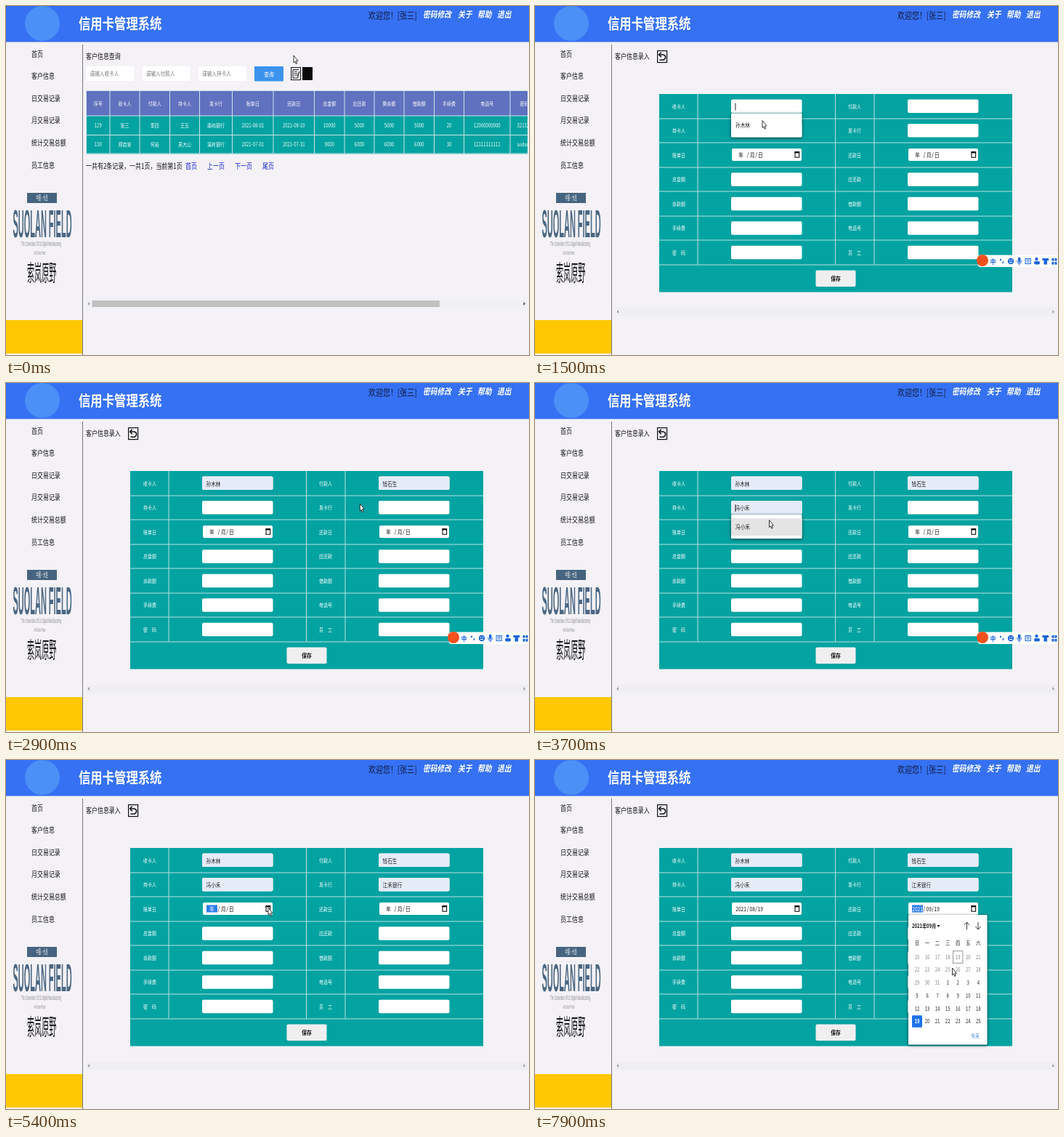
An HTML page with a canvas for the animation above (8000 ms loop, 720 by 480 pixels).

```html
<!DOCTYPE html>
<html lang="zh-CN">
<head>
<meta charset="utf-8">
<title>信用卡管理系统</title>
<style>
  html, body { margin: 0; width: 720px; height: 480px; overflow: hidden; background: #f4f2f7; }
  canvas { display: block; }
</style>
</head>
<body>
<canvas id="stage" width="720" height="480"></canvas>
<script>
const ctx = document.getElementById('stage').getContext('2d');
const LOOP = 8000, STEP = 100;
const SQUEEZE = 0.81; // the screen is shown narrower than it is tall
const SANS = '"Noto Sans CJK SC", "Noto Sans CJK", sans-serif';
const TEAL = '#02a3a1', AUTOFILL = '#e5ecf8', PICK = '#1f72ea';
const LEFT = 270, RIGHT = 513;

// Cursor path: time, x, y
const path = [
  [0, 396, 68], [100, 397, 79], [200, 399, 92], [400, 399, 93], [600, 349, 94],
  [900, 318, 130], [1200, 316, 138], [1600, 312, 164], [1900, 312, 164],
  [2200, 555, 138], [2300, 553, 139], [2400, 547, 149], [2600, 541, 163], [2800, 541, 164],
  [3200, 326, 172], [3300, 325, 173], [3600, 323, 187], [3800, 322, 190], [3900, 322, 192],
  [4200, 556, 171], [4300, 555, 173], [4600, 546, 196], [4800, 545, 198],
  [5200, 365, 205], [5400, 361, 203], [5600, 359, 212], [6000, 339, 305], [6300, 339, 306],
  [6700, 613.5, 206], [6900, 604, 204], [7100, 603, 205], [7400, 610, 227], [7600, 610, 228],
  [7900, 574.5, 286]
];

const picks = [
  { x: LEFT, row: 0, name: '孙木林', open: 1200, hover: 1600, done: 1900 },
  { x: RIGHT, row: 0, name: '钱石生', open: 2300, hover: 2600, done: 2800 },
  { x: LEFT, row: 1, name: '冯小禾', open: 3300, hover: 3600, done: 3900 },
  { x: RIGHT, row: 1, name: '江禾银行', open: 4300, hover: 4600, done: 4800 }
];

function rect(x, y, w, h, color) {
  ctx.fillStyle = color;
  ctx.fillRect(x, y, w, h);
}

function box(x, y, w, h, color, r = 2) {
  ctx.fillStyle = color;
  ctx.beginPath();
  ctx.roundRect(x, y, w, h, r);
  ctx.fill();
}

function disc(x, y, r, color) {
  ctx.fillStyle = color;
  ctx.beginPath();
  ctx.arc(x, y, r, 0, 7);
  ctx.fill();
}

function stroke(points, color = '#111', width = 1) {
  ctx.strokeStyle = color;
  ctx.lineWidth = width;
  ctx.beginPath();
  points.forEach(([x, y], i) => i ? ctx.lineTo(x, y) : ctx.moveTo(x, y));
  ctx.stroke();
}

function frame(x, y, w, h, color, width = 1) {
  ctx.strokeStyle = color;
  ctx.lineWidth = width;
  ctx.strokeRect(x, y, w, h);
}

function shadowBox(x, y, w, h) {
  ctx.save();
  ctx.shadowColor = 'rgba(0,0,0,.6)';
  ctx.shadowBlur = 4;
  ctx.shadowOffsetY = 1;
  box(x, y, w, h, '#fff', 1);
  ctx.restore();
}

// Text with y as the middle of the glyphs
function text(s, x, y, size, color = '#111', o = {}) {
  ctx.save();
  ctx.translate(x, y + size * 0.37);
  ctx.scale(o.squeeze || SQUEEZE, 1);
  ctx.font = `${o.style || 'normal'} ${o.weight || 400} ${size}px ${o.font || SANS}`;
  ctx.textAlign = o.align || 'left';
  ctx.fillStyle = color;
  ctx.fillText(s, 0, 0);
  ctx.restore();
}

const center = (s, x, y, size, color, o = {}) => text(s, x, y, size, color, { ...o, align: 'center' });

function header() {
  rect(0, 0, 720, 49.5, '#3671f4');
  disc(50, 24, 24, '#4a90f6');
  text('信用卡管理系统', 100, 24.5, 20.2, '#fff', { weight: 900 });
  text('欢迎您！[张三]', 499, 13, 12.3, '#101a38');
  [['密码修改', 574], ['关于', 622], ['帮助', 649], ['退出', 676]].forEach(([s, x]) =>
    text(s, x, 11.5, 12, '#fff', { weight: 700, style: 'italic' }));
}

function sidebar() {
  rect(105, 53, 1, 427, '#77767a');
  ['首页', '客户信息', '日交易记录', '月交易记录', '统计交易总额', '员工信息'].forEach((s, i) =>
    text(s, 35, 66 + i * 30.6, 9.84));
  rect(29, 257, 41, 14, '#46647f');
  center('中国·大连', 49.5, 264, 9, '#fff', { squeeze: 0.36 });
  const ink = '#4b6782', latin = '"Liberation Sans", sans-serif';
  text('SUOLAN FIELD', 9.5, 298, 53, ink, { weight: 700, font: latin, squeeze: 0.207 });
  center('The Consortium Of Co Digital Manufacturing', 48.5, 326.5, 9, '#8a8a90', { font: latin, squeeze: 0.31 });
  center('Art Data Place', 46.5, 339, 8, '#8a8a90', { font: latin, squeeze: 0.31 });
  text('索岚原野', 29, 367, 31, '#1c1c1e', { squeeze: 0.325 });
  rect(0, 432, 105, 46, '#ffc803');
}

function scrollbar(y, thumb) {
  rect(110, y - 5, 608, 10, thumb ? '#f1f0f3' : '#efeef1');
  if (thumb) rect(118.5, y - 4.5, 478.5, 9, '#c1c1c1');
  [[114, -1], [713.5, 1]].forEach(([x, d]) => {
    ctx.fillStyle = thumb && d > 0 ? '#444' : '#999';
    ctx.beginPath();
    ctx.moveTo(x - d, y - 2.5);
    ctx.lineTo(x + d * 1.5, y);
    ctx.lineTo(x - d, y + 2.5);
    ctx.fill();
  });
}

function listPage() {
  text('客户信息查询', 110, 69.5, 9.84, '#111', { weight: 500 });
  ['请输入收卡人', '请输入付款人', '请输入持卡人'].forEach((s, i) => {
    const x = 110.5 + i * 77.3;
    box(x, 83, 66, 20, '#fff', 1);
    text(s, x + 5, 93, 8.2, '#777');
  });
  box(342, 83, 40, 20.5, '#3c93ef', 1);
  center('查询', 362, 93.5, 8.4, '#fff');

  frame(392.6, 84.6, 13, 17, '#222', 1.1);
  stroke([[402, 95], [402, 99], [395, 99], [395, 87.5], [403, 87.5]], '#222');
  [90, 92.5, 95].forEach(y => stroke([[396.5, y], [401, y]], '#222', 0.9));
  stroke([[401.5, 96], [404, 90]], '#222', 1.3);
  rect(408, 84, 14, 18, '#0a0a0a');

  ctx.save();
  ctx.beginPath();
  ctx.rect(110, 116, 608, 88);
  ctx.clip();
  rect(110.5, 116.5, 610, 35, '#6071bf');
  rect(110.5, 151, 610, 52.5, TEAL);
  const edges = [110.5, 143, 184, 225.5, 266.5, 311.5, 368, 424.5, 466, 507, 548, 589.5, 630.5, 694, 733];
  const rows = [
    ['序号', '收卡人', '付款人', '持卡人', '发卡行', '账单日', '还款日', '总金额', '应还款', '剩余额', '借款额', '手续费', '电话号', '密码'],
    ['129', '张三', '李四', '王五', '南屿银行', '2021-08-01', '2021-08-10', '10000', '5000', '5000', '5000', '20', '12000000000', '321321'],
    ['130', '郑启安', '何岩', '吴大山', '溪岭银行', '2021-07-01', '2021-07-31', '9000', '6000', '6000', '6000', '30', '12111111111', 'asdasd']
  ];
  const line = '#c9e4ea';
  edges.forEach(x => rect(x - 0.5, 116.5, 1, 87, line));
  [116.5, 151, 177.5, 203].forEach(y => rect(110, y - 0.5, 610, 1, line));
  rows.forEach((cells, r) => cells.forEach((s, c) =>
    center(s, (edges[c] + edges[c + 1]) / 2, [134, 164.5, 190.5][r], 7.4, '#fff')));
  ctx.restore();

  text('一共有2条记录，一共1页，当前第1页', 110, 220.5, 9.84);
  [['首页', 247], ['上一页', 277], ['下一页', 315], ['尾页', 353]].forEach(([s, x]) =>
    text(s, x, 220.5, 9.84, '#1420d0'));
  scrollbar(409.5, true);
}

const rowTop = r => 121 + r * 33.55;

function dateField(x, value, focused) {
  box(x + 1, 196, 96, 17, '#fff');
  if (focused) rect(x + 6, 199.5, 15, 10, '#2b7de9');
  const [y, m, d] = value || ['年', '月', '日'];
  center(y, x + 13.6, 204.5, 8.2, focused ? '#fff' : '#111');
  center('/', x + 23, 204.5, 8.2);
  center(m, x + 29.3, 204.5, 8.2);
  center('/', x + 34.6, 204.5, 8.2);
  center(d, x + 40.2, 204.5, 8.2);
  frame(x + 88, 200.8, 5.6, 7.4, '#111', 1.1);
  rect(x + 87.5, 200, 6.6, 2.4, '#111');
}

function formPage(t) {
  text('客户信息录入', 110, 69.5, 9.84, '#111', { weight: 500 });
  frame(168.6, 61.6, 13, 16, '#111', 1.2);
  stroke([[171, 67], [177, 67], [179.5, 69], [179.5, 72], [177, 74.2], [171.5, 74.2]], '#111', 1.6);
  stroke([[173.8, 63.8], [170.6, 67], [173.8, 70.2]], '#111', 1.6);

  rect(171, 121, 486, 272.5, TEAL);
  const line = '#b9e2e1';
  for (let r = 1; r < 8; r++) rect(171, Math.round(rowTop(r)) - 0.5, 486, 1, line);
  [224, 413.5, 467].forEach(x => rect(x - 0.5, 121, 1, 234.5, line));

  const labels = [['收卡人', '付款人'], ['持卡人', '发卡行'], ['账单日', '还款日'], ['总金额', '应还款'],
    ['余款额', '借款额'], ['手续费', '电话号'], ['密　码', '员　工']];
  labels.forEach((pair, r) => {
    center(pair[0], 198, rowTop(r) + 17, 7.4, '#fff');
    center(pair[1], 440, rowTop(r) + 17, 7.4, '#fff');
    if (r !== 2) [LEFT, RIGHT].forEach(x => box(x, rowTop(r) + 7.5, 97.5, 18.5, '#fff'));
  });
  box(386.5, 363.5, 55, 22.5, '#efeff0');
  center('保存', 414, 375, 8.4, '#111', { weight: 700 });

  dateField(LEFT, t >= 6300 && ['2021', '08', '19'], t >= 5400 && t < 7000);
  dateField(RIGHT, t >= 7500 && ['2021', '09', '19'], t >= 7000);
  scrollbar(420.5, false);

  picks.forEach(p => pickField(p, t));
  if (t >= 5500 && t < 6300) calendar(271, 0, false);
  if (t >= 7100) calendar(514, t < 7500 ? 0 : Math.floor((t - 7500) / 200), t >= 7500);
  if (t >= 1200 && t < 5400) inputBar();
}

function pickField(p, t) {
  if (t < p.open) return;
  const y = rowTop(p.row) + 7.5, active = t < p.done, filled = t >= p.hover;
  if (filled) {
    box(p.x, y, 97.5, 18.5, AUTOFILL);
    text(p.name, p.x + 5.5, y + 10, 8.2, '#222');
  }
  if (!active) return;
  rect(p.x + 5.5, y + 5, 0.9, 10, '#111');
  shadowBox(p.x, y + 19, 97.5, 33);
  if (filled) rect(p.x, y + 24, 97.5, 24, '#e4e4e4');
  text(p.name, p.x + 6, y + 35.5, 8.2, '#222');
}

function arrow(x, y, d) {
  stroke([[x, y - 5 * d], [x, y + 5 * d]], '#222', 0.9);
  stroke([[x - 3.6, y + d], [x, y + 5 * d], [x + 3.6, y + d]], '#222', 0.9);
}

function calendar(x, scroll, september) {
  shadowBox(x, 213, 108.5, 178.5);
  text(september ? '2021年09月' : '2021年08月', x + 5, 228, 7.4, '#111', { weight: 700 });
  ctx.fillStyle = '#111';
  ctx.beginPath();
  ctx.moveTo(x + 39.5, 227);
  ctx.lineTo(x + 43.5, 227);
  ctx.lineTo(x + 41.5, 230);
  ctx.fill();
  arrow(x + 80.5, 228, -1);
  arrow(x + 96, 228, 1);
  const month = september ? 8 : 7;
  for (let i = 0; i < 42; i++) {
    const cx = x + 12 + (i % 7) * 14.05, cy = 271 + Math.floor(i / 7) * 17.75;
    if (i < 7) center('日一二三四五六'[i], cx, 251, 7.4);
    const day = new Date(2021, 7, 1 + i + scroll * 7), n = day.getDate(), m = day.getMonth();
    const chosen = september && m === 8 && n === 19;
    if (chosen) box(cx - 7, cy - 8.5, 14, 16.5, PICK, 1);
    if (m === 7 && n === 19) frame(cx - 6.7, cy - 8.3, 13.4, 16.6, '#8a8a8a', 0.9);
    center(n, cx, cy, 7.4, chosen ? '#fff' : m === month ? '#222' : '#808080', { weight: chosen ? 700 : 400 });
  }
  center('今天', x + 92, 379.5, 7.4, '#2574d8');
}

function inputBar() {
  const blue = '#1b66dc';
  box(610, 342.5, 114, 16.5, '#fff', 3);
  disc(616, 350, 8, '#f4511e');
  center('中', 630.5, 351, 9.5, blue, { weight: 700 });
  disc(641, 349, 1.2, blue);
  stroke([[645, 351], [643.8, 354]], blue, 1.4);
  disc(655, 351, 4.2, blue);
  rect(652.8, 349, 1.4, 1.4, '#fff');
  rect(655.8, 349, 1.4, 1.4, '#fff');
  rect(653, 352, 4, 1.2, '#fff');
  box(665, 345.5, 3.4, 7, blue);
  stroke([[663.5, 350], [664.5, 353.5], [668.8, 353.5], [669.8, 350]], blue, 0.9);
  rect(666.2, 353.5, 1, 3, blue);
  frame(675, 347.5, 7.4, 7, blue);
  [349.5, 352].forEach(y => stroke([[676.5, y], [681, y]], blue, 1.1));
  disc(690.5, 348, 2.2, blue);
  box(687, 351, 8, 4.6, blue);
  rect(700.5, 347, 4.6, 8.5, blue);
  rect(698.5, 347, 8.6, 3, blue);
  [711.5, 715.5].forEach(x => [347, 352].forEach(y => rect(x, y, 3, 3.6, blue)));
}

function statusBar() {
  box(-2, 468, 119, 14, '#c3c4c8', 2);
  box(-2, 469, 118, 14, '#dfe1e5', 2);
  text('user-20200618gm:3000/customer/add', 2.5, 475, 7.4, '#3a3c40');
}

function cursor(t) {
  const i = Math.max(1, path.findIndex(p => p[0] >= t));
  const [t0, x0, y0] = path[i - 1], [t1, x1, y1] = path[i];
  const k = (t - t0) / (t1 - t0);
  ctx.save();
  ctx.translate(x0 + (x1 - x0) * k, y0 + (y1 - y0) * k);
  ctx.beginPath();
  [[0, 0], [0, 10], [1.9, 8.2], [3.2, 11.6], [4.7, 10.9], [3.4, 7.6], [5.8, 7.3]].forEach(p => ctx.lineTo(...p));
  ctx.closePath();
  ctx.fillStyle = '#fff';
  ctx.fill();
  ctx.strokeStyle = '#222';
  ctx.lineWidth = 0.9;
  ctx.stroke();
  ctx.restore();
}

function draw(t) {
  rect(0, 0, 720, 480, '#f4f2f6');
  header();
  sidebar();
  if (t < 400) listPage(); else formPage(t);
  if (t >= 200 && t < 1000) statusBar();
  cursor(t);
}

const start = performance.now();
let last = -1;
function tick() {
  const t = Math.floor(((performance.now() - start) % LOOP) / STEP) * STEP;
  if (t !== last) draw(last = t);
  requestAnimationFrame(tick);
}
tick();
</script>
</body>
</html>
```
